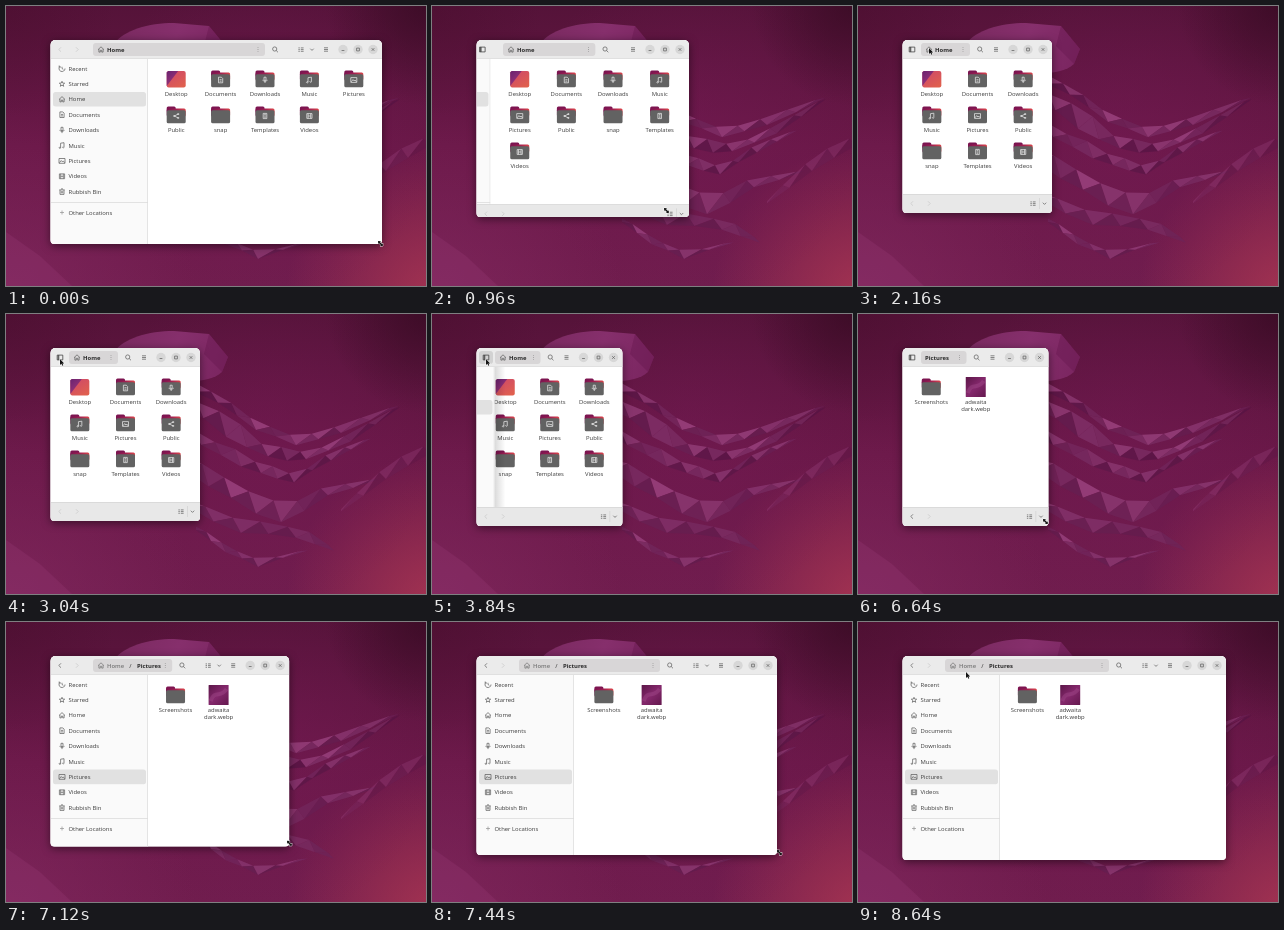
Write an HTML page with a canvas that moves like this. It is 420 px wide and 280 px high and loops after 8.72 s.

```html
<!DOCTYPE html>
<html lang="en">
<head>
<meta charset="utf-8">
<title>Resizing a file manager</title>
<style>
html, body { margin: 0; width: 100%; height: 100%; overflow: hidden; background: #64184c; }
canvas { display: block; width: 420px; height: 280px; }
</style>
</head>
<body>
<canvas id="stage"></canvas>
<script>
const W = 420, H = 280, LOOP = 8720, STEP = 80;
const LEFT = 45, TOP = 34, HEAD = 19, SIDE = 97;
const FONT = '"Open Sans", "Noto Sans", sans-serif';
const INK = '#3d3d3d', SOFT = '#626262', FAINT = '#c8c8c8';
const dpr = window.devicePixelRatio || 1;
const stage = document.getElementById('stage');
stage.width = W * dpr;
stage.height = H * dpr;
let c = stage.getContext('2d');

const mix = (a, b, p) => a + (b - a) * p;
const clamp = v => Math.max(0, Math.min(1, v));
const smooth = p => p * p * (3 - 2 * p);
const linear = p => p;
const ramp = (t, a, b) => clamp((t - a) / (b - a));

// Piecewise track: [time, value, ...] rows, all values eased between rows
function track(t, rows, ease = smooth) {
  if (t <= rows[0][0]) return rows[0].slice(1);
  for (let i = 1; i < rows.length; i++) {
    const a = rows[i - 1], b = rows[i];
    if (t < b[0]) {
      const p = ease(ramp(t, a[0], b[0]));
      return a.slice(1).map((v, k) => mix(v, b[k + 1], p));
    }
  }
  return rows[rows.length - 1].slice(1);
}

function box(x, y, w, h, r, fill) {
  c.beginPath();
  c.roundRect(x, y, w, h, r);
  if (fill) { c.fillStyle = fill; c.fill(); }
}
function poly(pts, fill) {
  c.beginPath();
  pts.forEach(([x, y]) => c.lineTo(x, y));
  c.closePath();
  c.fillStyle = fill;
  c.fill();
}
function path(d, x, y, color, lw = 0.75) {
  c.save();
  c.translate(x, y);
  c.strokeStyle = color;
  c.lineWidth = lw;
  c.stroke(new Path2D(d));
  c.restore();
}
function text(s, x, y, color = INK, align = 'left', weight = 500, size = 5.9) {
  c.font = `${weight} ${size}px ${FONT}`;
  c.textAlign = align;
  c.fillStyle = color;
  c.fillText(s, x, y + 2.1);
}
function gradient(x0, y0, x1, y1, ...colors) {
  const g = c.createLinearGradient(x0, y0, x1, y1);
  colors.forEach((s, i) => g.addColorStop(i / (colors.length - 1), s));
  return g;
}
function glow(x, y, r, rgb, a) {
  const g = c.createRadialGradient(x, y, 0, x, y, r);
  g.addColorStop(0, `rgba(${rgb},${a})`);
  g.addColorStop(1, `rgba(${rgb},0)`);
  c.fillStyle = g;
  c.fillRect(0, 0, W, H);
}

// ---- wallpaper ----
function random(seed) {
  return () => (seed = (seed * 16807) % 2147483647) / 2147483647;
}
// Strip of long slanted shards along a spine of [x, y, width]
function ribbon(seed, rows) {
  const rnd = random(seed), n = (rows.length - 1) * 2;
  const spine = rows.map((r, k) => [k, ...r]);
  const edge = (u, side) => {
    const [x, y, w] = track(u, spine, linear);
    return [x, y + side * w / 2 * mix(0.5, 1.2, rnd())];
  };
  const shade = (lo, hi) => {
    const v = mix(lo, hi, rnd());
    return `rgb(${mix(88, 154, v)},${mix(20, 66, v)},${mix(68, 126, v)})`;
  };
  let up = edge(0, -1), low = edge(0, 1);
  for (let i = 0; i < n; i++) {
    const nextUp = edge((i + 0.7) / 2, -1), nextLow = edge((i + 1) / 2, 1);
    poly([up, nextUp, low], shade(0.35, 1));
    poly([nextUp, nextLow, low], shade(0, 0.6));
    up = nextUp;
    low = nextLow;
  }
}
function wallpaper() {
  const sheet = document.createElement('canvas');
  sheet.width = W * dpr;
  sheet.height = H * dpr;
  const main = c;
  c = sheet.getContext('2d');
  c.scale(dpr, dpr);
  c.fillStyle = gradient(0, 0, 0, H, '#551339', '#6a1848', '#701d4e');
  c.fillRect(0, 0, W, H);
  glow(430, 290, 150, '180,58,82', 0.75);
  glow(260, 130, 170, '116,26,84', 0.5);
  glow(420, 0, 100, '46,8,28', 0.6);
  glow(0, 0, 110, '70,12,42', 0.4);
  glow(0, 290, 190, '140,46,104', 0.45);
  poly([[0, 226], [34, 250], [66, H], [0, H]], 'rgba(150,58,116,.3)');
  // bell
  c.beginPath();
  c.moveTo(108, 38);
  c.bezierCurveTo(118, 24, 142, 17, 168, 17);
  c.lineTo(203, 20);
  c.lineTo(222, 43);
  c.lineTo(216, 58);
  c.bezierCurveTo(206, 67, 188, 69, 160, 66);
  c.closePath();
  c.fillStyle = gradient(110, 20, 220, 66, '#7a2a60', '#862f6c', '#7a2560');
  c.fill();
  poly([[203, 20], [222, 43], [216, 58], [198, 40]], 'rgba(104,24,80,.45)');
  c.globalAlpha = 0.85;
  ribbon(91, [[165, 62, 10], [212, 84, 9], [250, 113, 9], [290, 127, 9], [335, 116, 8], [393, 91, 2]]);
  ribbon(57, [[175, 84, 20], [220, 112, 22], [262, 138, 14], [300, 143, 9], [345, 124, 8], [394, 92, 2]]);
  ribbon(23, [[175, 115, 14], [215, 135, 13], [255, 155, 13], [288, 165, 9], [325, 143, 8], [365, 124, 1]]);
  ribbon(71, [[180, 150, 18], [225, 176, 24], [275, 200, 18], [322, 178, 12], [372, 165, 1]]);
  ribbon(39, [[180, 188, 11], [235, 214, 12], [290, 217, 14], [328, 236, 2]]);
  ribbon(47, [[190, 214, 6], [220, 234, 8], [252, 249, 7], [302, 236, 1]]);
  c.globalAlpha = 0.4;
  ribbon(13, [[335, 196, 3], [380, 158, 13], [424, 134, 10]]);
  c = main;
  return sheet;
}

// ---- small icons, centred on 0,0 ----
const ICON = {
  recent: 'M3 0A3 3 0 1 1 -2 -2.2M-2.8 -3V-1.4H-1.2M0 -1.7V0L1.3 .8',
  star: 'M0 -2.6L.8 -.8L2.7 -.7L1.2 .5L1.7 2.4L0 1.3L-1.7 2.4L-1.2 .5L-2.7 -.7L-.8 -.8Z',
  home: 'M-3 .2L0 -2.7L3 .2M-2.1 -.4V2.6H-.7V.8H.7V2.6H2.1V-.4',
  doc: 'M-2.1 -2.8H.8L2.1 -1.5V2.8H-2.1ZM-1 -.3H1M-1 1.2H1',
  down: 'M-1 -2.8H1V.4H-1ZM-2.1 -.2C-2.1 2 2.1 2 2.1 -.2M0 1.4V3',
  music: 'M-1.4 2V-2.3L2 -2.8V1.4M-1.4 2A.8 .6 0 1 1 -2.6 1.8A.8 .6 0 0 1 -1.4 2M2 1.4A.8 .6 0 1 1 .8 1.2',
  image: 'M-3 -2.4H3V2.4H-3ZM-2.5 1.8L-.8 -.4L.4 1L1.3 0L2.6 1.8',
  film: 'M-2.6 -2.4H2.6V2.4H-2.6ZM-1.3 -2.4V2.4M1.3 -2.4V2.4M-1.3 0H1.3',
  bin: 'M-2.7 -1.8H2.7M-1 -2.8H1M-2 -1.8V2.7H2V-1.8M-.7 -.6V1.6M.7 -.6V1.6',
  plus: 'M-2 0H2M0 -2V2',
  share: 'M2 -2L-1.8 0L2 2M1.4 -2.3H2.6V-1.5H1.4ZM-2.5 -.4H-1.3V.4H-2.5ZM1.4 1.5H2.6V2.3H1.4Z',
  page: 'M-1.8 -2.6H1.8V2.6H-1.8ZM-.8 -1.4H.8M-.8 0H.8M-.8 1.3H.8',
  search: 'M1.8 -.5A2.1 2.1 0 1 1 -2.4 -.5A2.1 2.1 0 1 1 1.8 -.5M1.2 1L3 2.8',
  menu: 'M-2 -1.7H2M-2 0H2M-2 1.7H2',
  list: 'M-2.6 -1.6H-1.2M-2.6 .1H-1.2M-2.6 1.8H-1.2M-.2 -1.6H2.6M-.2 .1H2.6M-.2 1.8H2.6',
  chev: 'M-1.7 -.8L0 .9L1.7 -.8',
  back: 'M1 -2.2L-1.2 0L1 2.2',
  next: 'M-1 -2.2L1.2 0L-1 2.2',
  min: 'M-1.4 1H1.4',
  max: 'M-1.4 -1.4H1.4V1.4H-1.4Z',
  close: 'M-1.3 -1.3L1.3 1.3M1.3 -1.3L-1.3 1.3',
  panel: 'M-2.8 -2.4H2.8V2.4H-2.8ZM-1.8 -2.4V2.4M-1.2 -2.4V2.4'
};
const icon = (name, x, y, color = SOFT, lw) => path(ICON[name], x, y, color, lw);

const PLACES = [
  ['Recent', 'recent'], ['Starred', 'star'], ['Home', 'home'], ['Documents', 'doc'],
  ['Downloads', 'down'], ['Music', 'music'], ['Pictures', 'image'], ['Videos', 'film'],
  ['Rubbish Bin', 'bin']
];
const HOME = [
  ['Desktop', 'desktop'], ['Documents', 'doc'], ['Downloads', 'down'], ['Music', 'music'],
  ['Pictures', 'image'], ['Public', 'share'], ['snap', ''], ['Templates', 'page'], ['Videos', 'film']
];
const PICTURES = [['Screenshots', ''], ['adwaita', 'thumb', 'dark.webp']];

function folder(x, y, mark) {
  if (mark === 'desktop') {
    box(x - 9.5, y - 8, 19, 16.5, 2, gradient(x - 4, y - 8, x + 6, y + 8, '#cf4a68', '#e0604e'));
    poly([[x - 9.5, y - 6.5], [x - 8, y - 8], [x + 2, y - 8], [x - 9.5, y + 7]],
      gradient(x - 9, y - 8, x, y + 2, '#6a2370', '#9a3378'));
    return;
  }
  if (mark === 'thumb') {
    box(x - 10, y - 10, 20, 20, 0.5, gradient(x - 10, y - 10, x + 10, y + 10, '#5c1648', '#84286c', '#64184e'));
    path('M-8 6C-4 -6 2 4 8 -6', x, y, 'rgba(170,84,146,.35)', 4);
    return;
  }
  box(x - 9.5, y - 8.5, 9, 6, 1.5, '#7c1450');
  box(x - 9.5, y - 6.5, 19, 8, 1.5, gradient(x - 9, 0, x + 9, 0, '#7c1450', '#a01f50', '#d8434a'));
  box(x - 9.5, y - 4.8, 19, 13, 1.5, '#626262');
  if (mark) icon(mark, x, y + 1, '#e8e8e8', 0.75);
}

function grid(s, x, w) {
  const n = Math.max(1, Math.floor((w - 12) / 42)), gap = (w - 12) / n;
  (s.pictures ? PICTURES : HOME).forEach(([name, mark, more], i) => {
    const cx = x + 6 + gap * (i % n + 0.5), cy = 73 + 36 * Math.floor(i / n);
    folder(cx, cy, mark);
    text(name, cx, cy + 15, INK, 'center');
    if (more) text(more, cx, cy + 21.5, INK, 'center');
  });
}

function sidebar(s, edge, bottom, floating) {
  if (edge <= LEFT) return;
  c.save();
  c.beginPath();
  c.rect(LEFT, TOP + HEAD, edge - LEFT + (floating ? 11 : 0), bottom - TOP - HEAD);
  c.clip();
  if (floating) {
    c.fillStyle = gradient(edge, 0, edge + 11, 0, 'rgba(0,0,0,.15)', 'rgba(0,0,0,0)');
    c.fillRect(edge, TOP, 11, H);
  }
  const x = edge - SIDE;
  c.fillStyle = '#fafafa';
  c.fillRect(x, TOP, SIDE, H);
  c.fillStyle = '#dadada';
  c.fillRect(edge - 0.7, TOP, 0.7, H);
  box(x + 2, 62.5 + 15.4 * (s.pictures ? 6 : 2) - 7.3, 93, 14.6, 2.5, '#e1e1e1');
  PLACES.forEach(([name, mark], i) => {
    const y = 62.5 + 15.4 * i;
    icon(mark, x + 11, y);
    text(name, x + 17.5, y);
  });
  c.fillStyle = '#dcdcdc';
  c.fillRect(x, 196, SIDE, 0.8);
  icon('plus', x + 11, 206.5, '#999');
  text('Other Locations', x + 17.5, 206.5);
  c.restore();
}

function header(s) {
  const { right, fold, pictures } = s, y = 43.5;
  c.fillStyle = '#ebebeb';
  c.fillRect(LEFT, TOP, right - LEFT, HEAD);
  c.fillStyle = '#d9d9d9';
  c.fillRect(LEFT, TOP + HEAD - 0.6, right - LEFT, 0.6);

  if (fold > 0) {
    const x = mix(43, 54, fold);
    if (s.press) box(x - 7, 37, 14, 13, 3, '#d2d2d2');
    icon('panel', x, y, INK);
  }
  c.globalAlpha = clamp(1 - 1.6 * fold);
  icon('back', 54 - 20 * fold, y, pictures ? SOFT : FAINT);
  icon('next', 71 - 20 * fold, y, FAINT);
  icon('list', right - 81, y);
  icon('chev', right - 70, y);
  c.globalAlpha = 1;

  const x = mix(87, 63, fold), end = right - mix(117, 82, fold);
  box(x, 37, end - x, 13, 3, '#d8d6d7');
  if (!pictures) {
    icon('home', x + 8, y);
    text('Home', x + 14, y, '#2a2a2a', 'left', 700);
  } else if (fold > 0.5) {
    text('Pictures', x + 4, y, '#2a2a2a', 'left', 700);
  } else {
    icon('home', x + 8, y, '#777');
    text('Home', x + 14, y, '#777', 'left', 600);
    text('/', x + 37.5, y, '#555', 'center', 600);
    text('Pictures', x + 44, y, '#2a2a2a', 'left', 700);
  }
  for (const d of [-1.8, 0, 1.8]) box(end - 7.4, y + d - 0.4, 0.8, 0.8, 0.4, SOFT);

  icon('search', right - mix(107, 72, fold), y);
  icon('menu', right - 56, y);
  [['min', 39], ['max', 24], ['close', 9]].forEach(([name, d]) => {
    box(right - d - 4.7, y - 4.7, 9.4, 9.4, 4.7, '#d7d7d7');
    icon(name, right - d, y, SOFT);
  });
}

function footer(s) {
  const { right, bottom, fold } = s;
  if (!fold) return;
  const y = bottom - 19 * fold;
  c.fillStyle = '#e8e8e8';
  c.fillRect(LEFT, y, right - LEFT, 20);
  c.fillStyle = '#d2d2d2';
  c.fillRect(LEFT, y, right - LEFT, 0.6);
  c.fillRect(right - 13, y + 4, 0.7, 11);
  icon('back', 54, y + 9.5, s.pictures ? SOFT : FAINT);
  icon('next', 71, y + 9.5, FAINT);
  icon('list', right - 19, y + 9.5);
  icon('chev', right - 7.5, y + 9.5);
}

function pointer(s) {
  c.save();
  c.translate(s.px, s.py);
  c.lineJoin = 'round';
  c.strokeStyle = '#fff';
  c.lineWidth = 0.9;
  const shape = new Path2D(s.drag
    ? 'M-2 -2L1 -1.7L.1 -.8L2 1.1L2.8 .2V3H0L.9 2.1L-1 .2L-1.8 1Z'
    : 'M0 0V6L1.4 4.8L2.3 6.8L3.3 6.3L2.4 4.4H4.2Z');
  c.stroke(shape);
  c.fillStyle = '#151515';
  c.fill(shape);
  c.restore();
}

function stateAt(t) {
  const [right, bottom] = t < 3200
    ? track(t, [[0, 376, 238], [420, 362, 235], [500, 360, 234], [960, 257, 211], [1420, 194, 207]], linear)
    : track(t, [[6640, 190.5, 212], [7440, 345, 233], [7800, 368, 238]], linear);
  const dragging = t > 440 && t < 1360 || t > 6640 && t < 7780;
  const [px, py] = track(t, [
    [0, 374, 237], [420, 356, 234], [500, 352, 233], [960, 234, 204], [1360, 193, 206],
    [1520, 193, 206], [2080, 71, 42], [2240, 71, 42], [2720, 54, 45], [4080, 54, 45],
    [4880, 74, 154], [5440, 74, 154], [6320, 187, 207], [6640, 187, 207], [7440, 347, 230],
    [7780, 369, 237], [7860, 369, 237], [8480, 108, 50]
  ], dragging ? linear : smooth);
  return {
    right, bottom, px, py,
    drag: t < 1500 || t > 6320 && t < 7860,
    fold: t < 3200 ? ramp(t, 800, 1040) : 1 - ramp(t, 6800, 7040),
    open: smooth(ramp(t, 3775, 4015)) * (1 - smooth(ramp(t, 5120, 5360))),
    press: t >= 3680 && t < 5120,
    pictures: t >= 5040
  };
}

const back = wallpaper();

function draw(t) {
  const s = stateAt(t), { right, bottom, fold } = s, w = right - LEFT, h = bottom - TOP;
  c.setTransform(dpr, 0, 0, dpr, 0, 0);
  c.drawImage(back, 0, 0, W, H);
  c.save();
  c.shadowColor = 'rgba(0,0,0,.5)';
  c.shadowBlur = 9 * dpr;
  c.shadowOffsetY = 2 * dpr;
  box(LEFT - 0.5, TOP, w + 0.5, h, [5, 5, 4, 4], '#fff');
  c.restore();

  c.save();
  box(LEFT - 0.5, TOP, w + 0.5, h, [5, 5, 4, 4]);
  c.clip();
  c.fillStyle = '#fff';
  c.fillRect(LEFT - 1, TOP, w + 1, h);
  const edge = LEFT + SIDE * Math.pow(1 - fold, 1.8);
  grid(s, edge, right - edge);
  if (fold < 1) sidebar(s, edge, bottom, false);
  else sidebar(s, LEFT + SIDE * s.open, bottom, true);
  header(s);
  footer(s);
  c.restore();
  pointer(s);
}

const start = performance.now();
function tick(now) {
  const t = Math.max(0, now - start) % LOOP;
  draw(Math.floor(t / STEP) * STEP);
  requestAnimationFrame(tick);
}
draw(0);
requestAnimationFrame(tick);
</script>
</body>
</html>
```
